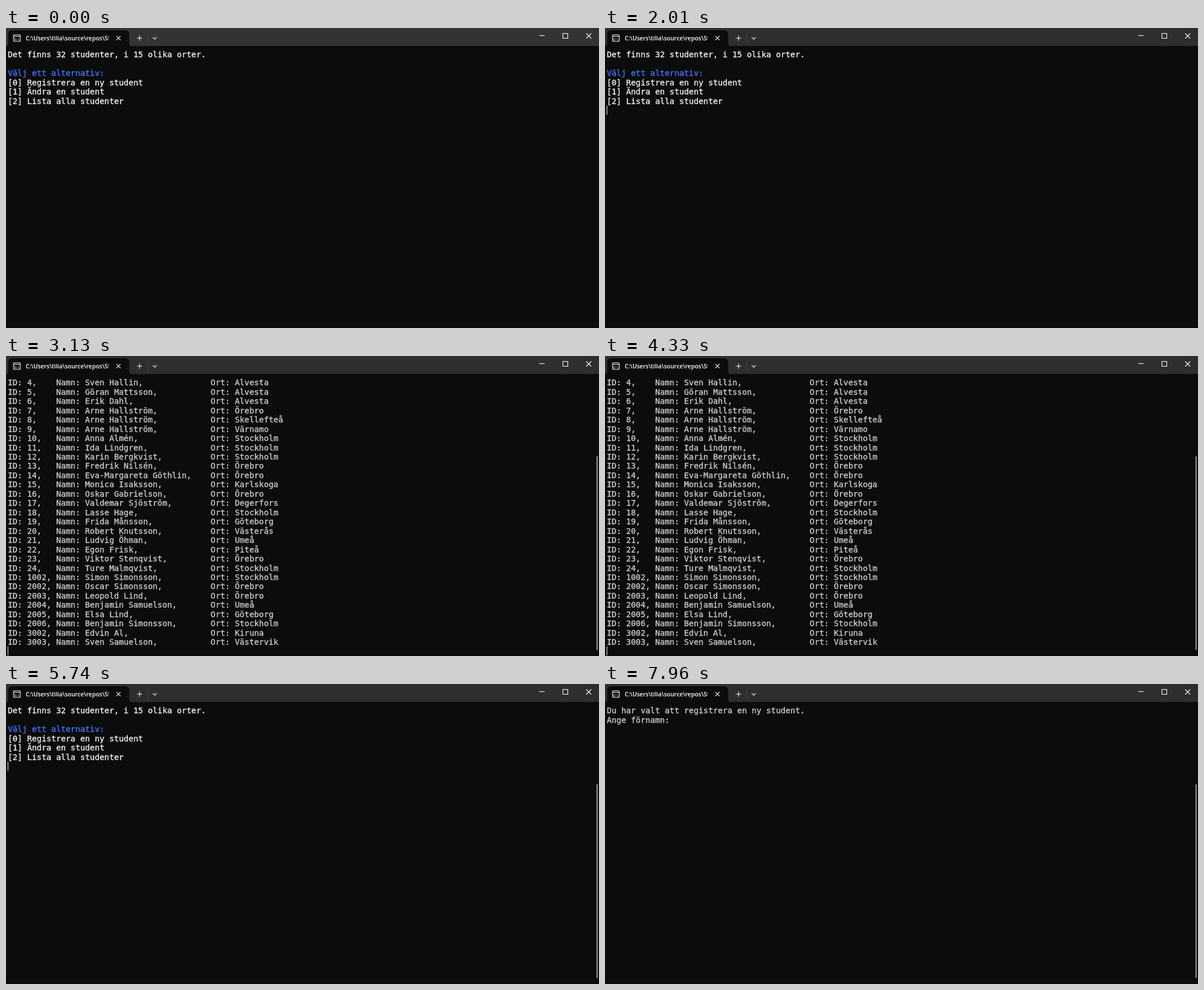
These frames come from a looping animation (1052 by 533 pixels, 8 s). An HTML page:

```html
<!DOCTYPE html>
<html lang="sv">
<head>
<meta charset="utf-8">
<title>Terminal</title>
<style>
  html, body { margin: 0; width: 100%; height: 100%; overflow: hidden; background: #0c0c0c; }
  svg { display: block; width: 1052px; height: 533px; }
  .line { font: 14.24px "DejaVu Sans Mono", monospace; white-space: pre; stroke-width: .35; }
  .title { font: 600 10.5px "Open Sans", "Noto Sans", sans-serif; fill: #fff; }
  .tiny { font: 700 5.5px "DejaVu Sans Mono", monospace; fill: #fff; }
  .ui { fill: none; stroke: #fff; stroke-width: 1.1; }
</style>
</head>
<body>
<svg viewBox="0 0 1052 533">
  <clipPath id="tabClip"><rect x="35" y="8" width="147" height="20"/></clipPath>
  <rect width="1052" height="533" fill="#0c0c0c"/>
  <rect id="bar" width="1052" height="32" fill="#333"/>
  <path d="M0 32 Q4 32 4 28 V11 Q4 4 11 4 H211.500 Q218.500 4 218.500 11 V28 Q218.500 32 222.500 32 Z" fill="#0c0c0c"/>

  <rect class="ui" x="13.300" y="12" width="12" height="11.800" rx="2"/>
  <path class="ui" d="M13.300 14.700 H25.300"/>
  <text class="tiny" x="14.400" y="21.500">C:\</text>
  <text class="title" x="35" y="22" clip-path="url(#tabClip)">C:\Users\tilia\source\repos\StudentApp</text>

  <path class="ui" d="M195.800 14.200 l7.400 7.400 m0 -7.400 l-7.400 7.400"/>
  <path class="ui" d="M232.400 18 h9.200 m-4.600 -4.600 v9.200"/>
  <path d="M251.500 9 V27" stroke="#454545"/>
  <path class="ui" d="M260.300 16.300 l3.600 3.600 l3.600 -3.600"/>
  <path class="ui" d="M946 13.500 h9.500"/>
  <rect class="ui" x="988" y="9.700" width="8.600" height="8.600"/>
  <path class="ui" d="M1029.300 9.500 l9 9 m0 -9 l-9 9"/>

  <g id="menu"></g>
  <g id="list"></g>
  <g id="form"></g>
  <rect id="caret" x="3" width="1" height="16" fill="#f2f2f2"/>

  <g id="track">
    <rect x="1037" y="32" width="15" height="501" fill="#2c2c2c"/>
    <path d="M1041.500 44.500 l3.500 -5 l3.500 5 z M1041.500 521 l3.500 5 l3.500 -5 z" fill="#9a9a9a"/>
  </g>
  <rect id="thumb" x="1047.500" y="178" width="2.200" height="344.500" rx="1.100" fill="#9c9c9c"/>
  <rect y="532" width="1052" height="1" fill="#050505"/>
</svg>
<script>
const LOOP = 8000, ROW = 16.46, TOP = 39.5, BASE = 52.3;
const WHITE = "#f2f2f2", GREY = "#cccccc", BLUE = "#3b78ff";
const $ = id => document.getElementById(id);

function write(id, lines, color) {
  lines.forEach((text, i) => {
    const el = document.createElementNS("http://www.w3.org/2000/svg", "text");
    const ink = text.startsWith("Välj") ? BLUE : color;
    el.setAttribute("class", "line");
    el.setAttribute("x", 3.2);
    el.setAttribute("y", BASE + i * ROW);
    el.setAttribute("fill", ink);
    el.setAttribute("stroke", ink);
    el.textContent = text;
    $(id).append(el);
  });
}

const students = `4 Sven Hallin/Alvesta
5 Göran Mattsson/Alvesta
6 Erik Dahl/Alvesta
7 Arne Hallström/Örebro
8 Arne Hallström/Skellefteå
9 Arne Hallström/Värnamo
10 Anna Almén/Stockholm
11 Ida Lindgren/Stockholm
12 Karin Bergkvist/Stockholm
13 Fredrik Nilsén/Örebro
14 Eva-Margareta Göthlin/Örebro
15 Monica Isaksson/Karlskoga
16 Oskar Gabrielson/Örebro
17 Valdemar Sjöström/Degerfors
18 Lasse Hage/Stockholm
19 Frida Månsson/Göteborg
20 Robert Knutsson/Västerås
21 Ludvig Öhman/Umeå
22 Egon Frisk/Piteå
23 Viktor Stenqvist/Örebro
24 Ture Malmqvist/Stockholm
1002 Simon Simonsson/Stockholm
2002 Oscar Simonsson/Örebro
2003 Leopold Lind/Örebro
2004 Benjamin Samuelson/Umeå
2005 Elsa Lind/Göteborg
2006 Benjamin Simonsson/Stockholm
3002 Edvin Al/Kiruna
3003 Sven Samuelson/Västervik`.split("\n").map(row => {
  const [, id, name, town] = row.match(/^(\d+) (.+)\/(.+)$/);
  return `ID: ${id},`.padEnd(10) + `Namn: ${name},`.padEnd(32) + `Ort: ${town}`;
});

write("menu", [
  "Det finns 32 studenter, i 15 olika orter.",
  "",
  "Välj ett alternativ:",
  "[0] Registrera en ny student",
  "[1] Ändra en student",
  "[2] Lista alla studenter"
], WHITE);
write("list", students, GREY);
write("form", ["Du har valt att registrera en ny student.", "Ange förnamn:"], GREY);

// Each track is a list of [start time, value]; values hold until the next step.
const tracks = {
  screen: [[0, "menu"], [2110, "list"], [4630, "menu"], [6240, "form"]],
  caret: [[0, 0], [790, 1], [1310, 0], [2010, 1], [2610, 0], [3130, 1], [3730, 0],
          [4330, 1], [5240, 0], [5740, 1], [6840, 0], [7450, 1], [7960, 0]],
  bar: [[0, "#333333"], [790, "#303030"], [900, "#2e2e2e"]],
  track: [[0, 0], [390, .33], [490, .67], [590, 1], [1310, .5], [1410, 0]],
  thumb: [[0, 0], [2110, 1]]
};
const caretRow = { menu: 6, list: 29, form: 2 };

function at(name, t) {
  return tracks[name].filter(([start]) => start <= t).pop()[1];
}

function draw(now) {
  const t = now % LOOP, screen = at("screen", t);
  for (const id in caretRow) $(id).style.display = id === screen ? "" : "none";
  for (const id of ["caret", "track", "thumb"]) $(id).style.opacity = at(id, t);
  $("caret").setAttribute("y", Math.floor(TOP + caretRow[screen] * ROW));
  $("bar").setAttribute("fill", at("bar", t));
}

const begin = performance.now();
function tick() {
  draw(performance.now() - begin);
  requestAnimationFrame(tick);
}
tick();
</script>
</body>
</html>
```
